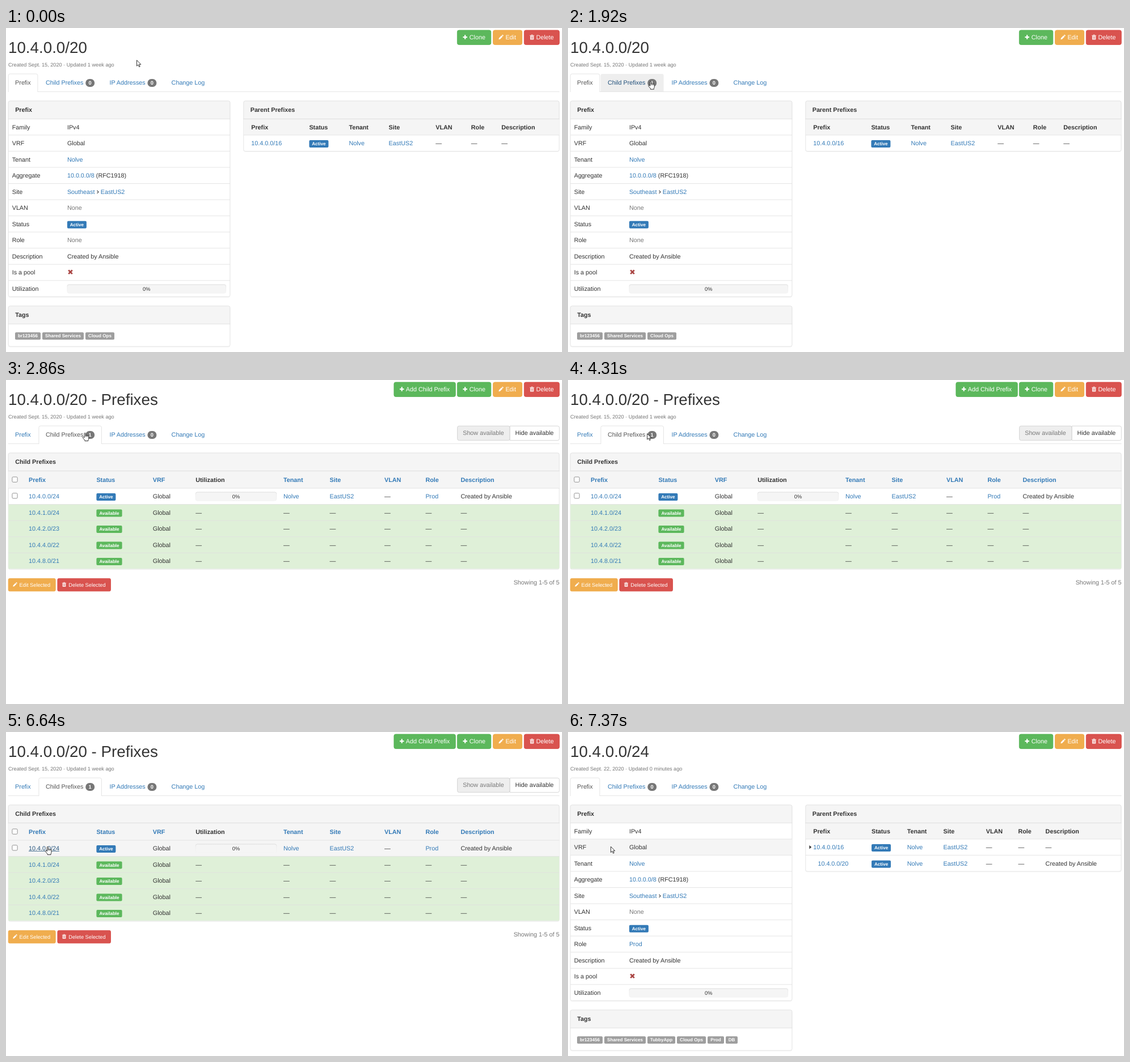
Animation of 980x572 px, one loop 7.77 s. Source, as an HTML page:

```html
<!DOCTYPE html>
<html lang="en">
<head>
<meta charset="utf-8">
<title>Prefix browser</title>
<style>
html, body { margin: 0; width: 100%; height: 100%; overflow: hidden; background: #fff; }
svg { display: block; width: 980px; height: 572px; }
text { font: 10.79px "Liberation Sans", Arial, sans-serif; fill: #333; text-rendering: geometricPrecision; white-space: pre; }
text.h1 { font-size: 27.75px; }
text.small { font-size: 9.17px; fill: #777; }
text.sm { font-size: 9.25px; }
text.b, text.badge, text.label { font-weight: bold; }
text.badge { font-size: 9.25px; }
text.label { font-size: 8.09px; }
.w, text.badge, text.label { fill: #fff; }
.l { fill: #337ab7; }
.m { fill: #777; }
.tab { fill: #555; }
.mid { text-anchor: middle; }
.end { text-anchor: end; }
.hot { fill: #23527c; }
.line { stroke: #ddd; stroke-width: .77; fill: none; }
</style>
</head>
<body>
<svg id="stage" viewBox="0 0 980 572">
  <defs>
    <linearGradient id="inset" x2="0" y2="1">
      <stop stop-color="#d9d9d9"/><stop offset=".3" stop-color="#ececec"/><stop offset="1" stop-color="#f3f3f3"/>
    </linearGradient>
  </defs>
  <g id="pages"></g>
  <path id="arrow" fill="#fff" stroke="#111" stroke-width=".85" stroke-linejoin="round"
    d="M.3 .3V10.6L2.7 8.4 4.4 12.2 6 11.5 4.4 7.8H7.6Z"/>
  <g id="hand" fill="#fff" stroke="#111" stroke-width=".85" stroke-linejoin="round">
    <path d="M-1 8.4V1.3a1 1 0 0 1 2 0V5.2a1 1 0 0 1 1.9 .2 1 1 0 0 1 1.9 .4 .9 .9 0 0 1 1.8 .5V9.6Q6.6 11.6 5.6 12.8V14.4H-.3V13L-3.7 9.1a1 1 0 0 1 1.4-1.5Z"/>
    <path d="M1 5.2V7.4M2.9 5.5V7.4M4.8 5.9V7.5" fill="none" stroke-width=".6"/>
  </g>
</svg>
<script>
const LOOP = 7770, ROW = 28.53;
const BLUE = '#337ab7', GREEN = '#5cb85c', GREY = '#9e9e9e';
const COLORS = { plus: [GREEN, '#4cae4c'], pencil: ['#f0ad4e', '#eea236'], trash: ['#d9534f', '#d43f3a'] };

const text = (x, y, s, cls = '') => `<text x="${x}" y="${y}" class="${cls}">${s}</text>`;
const rect = (x, y, w, h, fill, rest = '') =>
  `<rect x="${x}" y="${y}" width="${w}" height="${h}" fill="${fill}" ${rest}/>`;
const hline = (x1, x2, y) => `<path class="line" d="M${x1} ${y}H${x2}"/>`;
const link = s => `<tspan class="l">${s}</tspan>`;

// Label box sits around the row's baseline
const label = (x, y, w, s, fill = BLUE) =>
  rect(x, y - 9, w, 13, fill, 'rx="2"') + text(x + w / 2, y, s, 'label mid');

function icon(kind, x, y, k = 1) {
  const shapes = {
    plus: '<path d="M.3 4.8H8.1M4.2 .9V8.7" stroke="#fff" stroke-width="2.3"/>',
    pencil: '<path d="M0 9.2L.6 6.5 5.2 1.9 7.3 4 2.7 8.6ZM5.8 1.3L6.8 .4Q7.2 .1 7.6 .5L8.7 1.6Q9.1 2 8.7 2.4L7.9 3.4Z" fill="#fff"/>',
    trash: '<path d="M0 1.9H8.4M2.7 1.8L3.2 .6H5.2L5.7 1.8" stroke="#fff" fill="none" stroke-width=".9"/>' +
      `<path d="M.9 2.8H7.5V8.6Q7.4 9.5 6.7 9.5H1.7Q1 9.5 .9 8.6Z" fill="#fff"/>` +
      `<path d="M2.7 3.9V8.3M4.2 3.9V8.3M5.7 3.9V8.3" stroke="${COLORS.trash[0]}" stroke-width=".7"/>`
  };
  return `<g transform="translate(${x} ${y}) scale(${k})">${shapes[kind]}</g>`;
}

function button(kind, x, y, w, s, textX, small) {
  const [fill, edge] = COLORS[kind], h = small ? 22.4 : 25.5;
  return rect(x, y, w, h, fill, `stroke="${edge}" stroke-width=".77" rx="${small ? 2.3 : 3}"`) +
    icon(kind, x + (small ? 8 : 9.8), y + (small ? 6.4 : 7.6), small ? .86 : .95) +
    text(textX, y + (small ? 14.4 : 16.5), s, small ? 'w sm' : 'w');
}

function panel(x, y, w, h, title) {
  const box = 'rx="3"';
  return rect(x, y + .9, w, h, '#000', box + ' opacity=".05"') + rect(x, y, w, h, '#fff', box) +
    `<path d="M${x} ${y + 32.3}V${y + 3}q0-3 3-3H${x + w - 3}q3 0 3 3V${y + 32.3}Z" fill="#f5f5f5"/>` +
    hline(x, x + w, y + 32.2) +
    rect(x + .385, y + .385, w - .77, h - .77, 'none', box + ' class="line"') +
    text(x + 12.3, y + 20, title, 'b');
}

const bar = (x, y, w) =>
  rect(x, y, w, 15.2, '#f5f5f5', 'rx="3" stroke="url(#inset)" stroke-width=".9"') +
  text(x + w / 2, y + 11.2, '0%', 'sm mid');

const badge = (x, n, cls = '') =>
  rect(x, 90, 16, 14, '#777', 'rx="7"') + text(x + 8, 100.3, n, 'badge mid ' + cls);

function tabs(active, count) {
  const [x, w] = active ? [57.9, 110.6] : [4.2, 51.7];
  const cls = i => i === active ? 'tab' : 'l';
  return hline(3.85, 975.5, 112.5) +
    `<path class="tabHover" d="M57.6 112.1V84q0-3 3-3H165.6q3 0 3 3V112.1Z" fill="#eee" display="none"/>` +
    rect(x, 111, w, 2.2, '#fff') +
    `<path class="line" d="M${x} 112.9V84q0-3 3-3H${x + w - 3}q3 0 3 3V112.9"/>` +
    text(16.1, 100.2, 'Prefix', cls(0)) + text(69.9, 100.2, 'Child Prefixes', cls(1) + ' childTab') +
    badge(140.2, count, 'count') + text(182.4, 100.2, 'IP Addresses', 'l') + badge(249.4, 0) +
    text(291.6, 100.2, 'Change Log', 'l');
}

const pageHead = (title, info, active, count) =>
  text(4, 44.2, title, 'h1') + text(3.9, 68.2, info, 'small') +
  button('plus', 795.4, 3.9, 59.4, 'Clone', 816.8) +
  button('pencil', 858.6, 3.9, 51, 'Edit', 880.4) +
  button('trash', 913.3, 3.9, 62, 'Delete', 934.4) + tabs(active, count);

function detailPage(o) {
  const rows = [['Family', 'IPv4'], ['VRF', 'Global'], ['Tenant', link('Nolve')],
    ['Aggregate', link('10.0.0.0/8') + ' (RFC1918)'], ['Site', link('Southeast')],
    ['VLAN', '<tspan class="m">None</tspan>'], ['Status', ''], ['Role', o.role],
    ['Description', 'Created by Ansible'], ['Is a pool', ''], ['Utilization', '']];
  let s = pageHead(o.title, o.info, 0, 0) + panel(3.85, 128.4, 391.4, 346.4, 'Prefix') +
    rect(4.6, 189, 389.9, ROW, '#f5f5f5', 'class="vrfHover" display="none"');
  rows.forEach(([name, value], i) => {
    const y = 178.6 + ROW * i;
    if (i) s += hline(4.2, 394.9, 189 + ROW * (i - 1));
    s += text(10.7, y, name) + text(107.9, y, value);
  });
  s += text(166.8, 178.6 + ROW * 4, 'EastUS2', 'l') +
    '<path d="M160.6 286.8L163 289.4 160.6 292" fill="none" stroke="#333" stroke-width="1.1"/>' +
    label(107.9, 349.8, 34, 'Active') +
    '<path d="M110.2 427.5L116.8 434.1M116.8 427.5L110.2 434.1" stroke="#a94442" stroke-width="2.7"/>' +
    bar(108, 453, 279.6) + panel(3.85, 490.4, 391.4, 72.2, 'Tags');
  for (const [x, w, name] of o.tags) s += label(x, 546.3, w, name, GREY);

  const c = o.cols;
  s += panel(418.4, 128.4, 557, 61 + ROW * o.parents.length, 'Parent Prefixes') +
    rect(418.8, 161, 556.2, 28, '#f5f5f5') + hline(418.4, 975.4, 160.6);
  ['Prefix', 'Status', 'Tenant', 'Site', 'VLAN', 'Role', 'Description']
    .forEach((name, i) => s += text(c[i], 178.6, name, 'b'));
  o.parents.forEach(([x, prefix, note], i) => {
    const y = 207.1 + ROW * i;
    s += hline(418.8, 975, 189 + ROW * i) + text(x, y, prefix, 'l') + label(c[1], y, 34, 'Active') +
      text(c[2], y, 'Nolve', 'l') + text(c[3], y, 'EastUS2', 'l') +
      text(c[4], y, '—') + text(c[5], y, '—') + text(c[6], y, note);
  });
  return s + (o.parents.length > 1 ? '<path d="M425.4 200L429.2 203.3 425.4 206.6Z" fill="#333"/>' : '');
}

function listPage() {
  const c = [40, 159.4, 258.8, 334.2, 489, 570.6, 667, 739.4, 801.4];
  const check = y => rect(10.9, y, 9.2, 9.2, '#fff', 'rx="1.8" stroke="#767676" stroke-width=".8"');
  let s = pageHead('10.4.0.0/20 - Prefixes', 'Created Sept. 15, 2020 · Updated 1 week ago', 1, 1) +
    button('plus', 683.9, 3.9, 108.4, 'Add Child Prefix', 704.8) +
    '<g opacity=".65">' + rect(795.6, 81.2, 92.6, 25.4, '#e6e6e6', 'stroke="#adadad" stroke-width=".77" rx="3"') +
    text(805.2, 97.4, 'Show available') + '</g>' +
    `<path d="M888.2 81.2H972.3q3 0 3 3V103.6q0 3-3 3H888.2Z" fill="#fff" stroke="#ccc" stroke-width=".77"/>` +
    text(897.6, 97.4, 'Hide available') +
    panel(3.85, 128.4, 971.6, 205.8, 'Child Prefixes') + rect(4.3, 161, 970.8, 30, '#f5f5f5') +
    rect(4.3, 191, 970.8, ROW, '#f5f5f5', 'class="rowHover" display="none"') +
    hline(4, 975.3, 160.6) + hline(4, 975.3, 191.1) + check(171.1) + check(199.8);
  ['Prefix', 'Status', 'VRF', 'Utilization', 'Tenant', 'Site', 'VLAN', 'Role', 'Description']
    .forEach((name, i) => s += text(c[i], 180.4, name, i === 3 ? 'b' : 'b l'));
  ['0.0/24', '1.0/24', '2.0/23', '4.0/22', '8.0/21'].forEach((tail, i) => {
    const y = 209 + ROW * i;
    if (i) s += rect(4.3, 191.1 + ROW * i, 970.8, ROW - (i > 3 ? .6 : 0), '#dff0d8') + hline(4.3, 975, 191.1 + ROW * i);
    s += text(c[0], y, '10.4.' + tail, i ? 'l' : 'l rowLink') + text(c[2], y, 'Global');
    if (i) {
      s += label(c[1], y, 45.2, 'Available', GREEN);
      for (const x of c.slice(3)) s += text(x, y, '—');
    } else {
      s += label(c[1], y, 34, 'Active') + bar(c[3], 198, 142.6) + text(c[4], y, 'Nolve', 'l') +
        text(c[5], y, 'EastUS2', 'l') + text(c[6], y, '—') + text(c[7], y, 'Prod', 'l') +
        text(c[8], y, 'Created by Ansible');
    }
  });
  return s + button('pencil', 4.2, 350.4, 83, 'Edit Selected', 23.6, true) +
    button('trash', 90.9, 350.4, 93.6, 'Delete Selected', 110.3, true) +
    text(975.6, 361, 'Showing 1-5 of 5', 'm end') +
    '<path class="rowLine" d="M40 210.4H94" stroke="#23527c" stroke-width=".8" display="none"/>';
}

const pages = [
  detailPage({
    title: '10.4.0.0/20', info: 'Created Sept. 15, 2020 · Updated 1 week ago',
    role: '<tspan class="m">None</tspan>',
    tags: [[16, 45, 'br123456'], [64, 73, 'Shared Services'], [140, 51, 'Cloud Ops']],
    cols: [432.2, 534.4, 604.4, 674.6, 757.3, 819.8, 873.2],
    parents: [[432.2, '10.4.0.0/16', '—']]
  }),
  listPage(),
  detailPage({
    title: '10.4.0.0/24', info: 'Created Sept. 22, 2020 · Updated 0 minutes ago',
    role: link('Prod'),
    tags: [[16, 45, 'br123456'], [64, 73, 'Shared Services'], [140, 49, 'TubbyApp'],
      [192, 51, 'Cloud Ops'], [246, 29, 'Prod'], [278, 21, 'DB']],
    cols: [432.2, 535, 597.8, 661.6, 736.8, 793.4, 841.6],
    parents: [[432.2, '10.4.0.0/16', '—'], [440.4, '10.4.0.0/20', 'Created by Ansible']]
  })
];

const $ = sel => document.querySelector(sel);
$('#pages').innerHTML = pages.map((p, i) => `<g id="page${i}">${p}</g>`).join('');
const show = (el, on) => el.setAttribute('display', on ? 'inline' : 'none');
const pageEls = pages.map((_, i) => $('#page' + i));
const count = $('#page0 .count'), childTab = $('#page0 .childTab'), tabHover = $('#page0 .tabHover');
const rowHover = $('.rowHover'), rowLink = $('.rowLink'), rowLine = $('.rowLine');
const vrfHover = $('#page2 .vrfHover'), arrow = $('#arrow'), hand = $('#hand');

// Pointer moves: first step, last step, number of steps, end point
const moves = [
  [1240, 1970, 16, 143, 95], [2020, 2110, 3, 139.2, 93.2], [2440, 2440, 1, 136, 85.6],
  [2610, 2610, 1, 139.2, 93.2], [3100, 3100, 1, 139.6, 93.8], [4310, 5070, 16, 100, 165],
  [5120, 5720, 13, 75, 201.4], [5860, 5860, 1, 74.2, 202], [6000, 6050, 2, 73.4, 202.2],
  [6540, 6540, 1, 69.5, 195.6], [6590, 6640, 2, 73.4, 202.2], [7080, 7080, 1, 75.5, 201.8],
  [7370, 7370, 1, 75.2, 202]
];
const ease = u => u < .5 ? 2 * u * u : 1 - 2 * (1 - u) ** 2;

function pointer(t) {
  let x = 230.2, y = 56.5;
  for (const [start, end, n, toX, toY] of moves) {
    if (t < start) break;
    const step = n > 1 ? Math.floor((t - start) / (end - start) * (n - 1) + 1e-6) + 1 : 1;
    const u = ease(Math.min(1, step / n));
    x += (toX - x) * u;
    y += (toY - y) * u;
  }
  return [x, y];
}

function draw(t) {
  const page = t < 2860 ? 0 : t < 6830 ? 1 : 2;
  const [x, y] = pointer(t);
  const onTab = page === 0 && x < 168.5 && y > 81;
  const onLink = page === 1 && t >= 5670;
  pageEls.forEach((el, i) => show(el, i === page));
  count.textContent = t < 810 ? 0 : 1;
  show(tabHover, onTab);
  childTab.setAttribute('class', onTab ? 'hot' : 'l');
  show(rowHover, page === 1 && y > 191);
  rowLink.setAttribute('class', onLink ? 'hot' : 'l');
  show(rowLine, onLink);
  show(vrfHover, t >= 7080);
  const isHand = onTab || onLink || (page === 1 && t < 3100) || (page === 2 && t < 7080);
  show(hand, isHand);
  show(arrow, !isHand);
  (isHand ? hand : arrow).setAttribute('transform', `translate(${x} ${y})`);
}

const began = performance.now();
function tick() {
  draw((performance.now() - began) % LOOP);
  requestAnimationFrame(tick);
}
tick();
</script>
</body>
</html>
```
